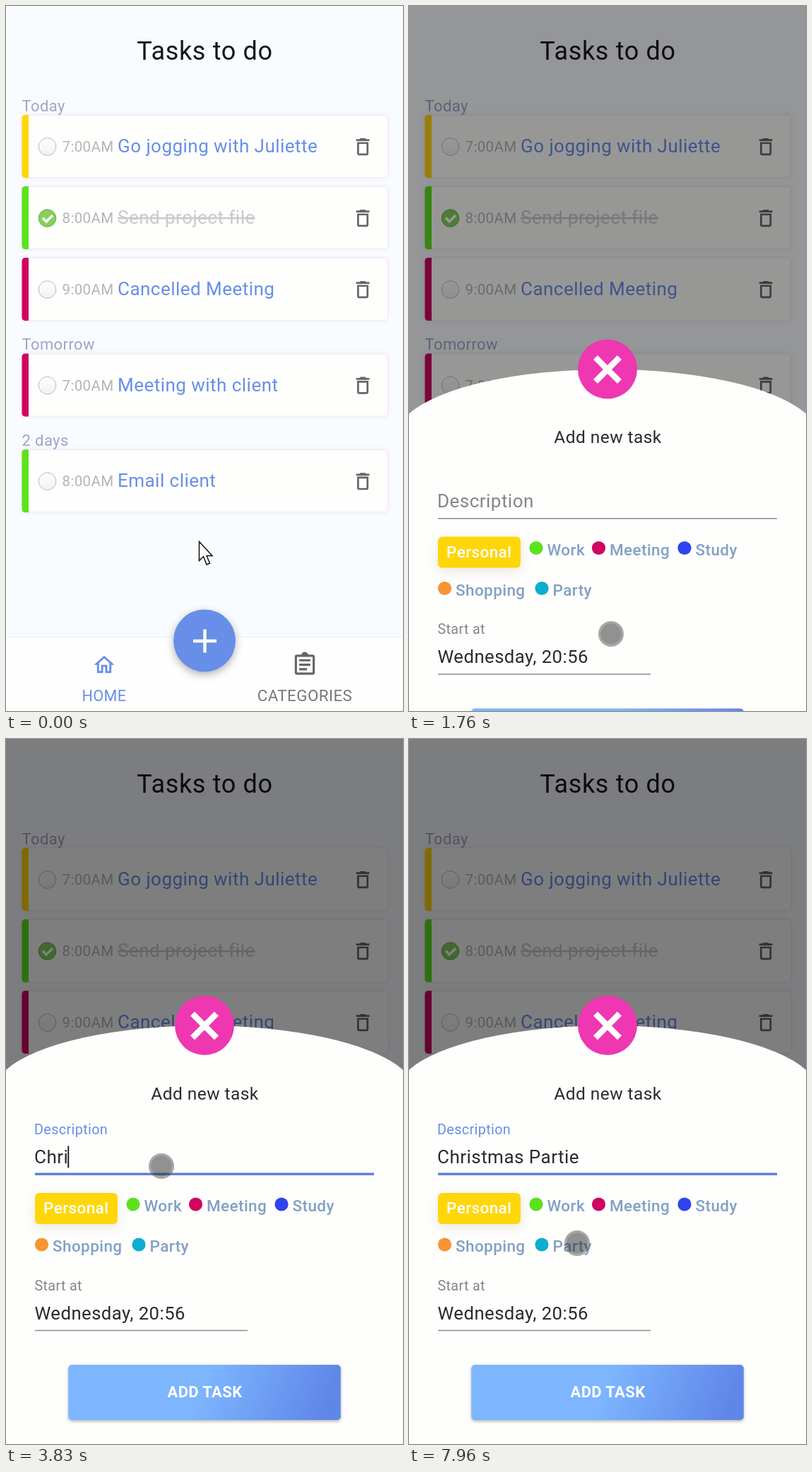
Recreate the animation shown at these times as an HTML page. Size 562 by 997 pixels, loop 8000 ms.

```html
<!DOCTYPE html>
<html lang="en">
<head>
<meta charset="utf-8">
<title>Tasks to do</title>
<style>
  html, body { margin: 0; width: 100%; height: 100%; overflow: hidden; background: #f9fcfe; }
  svg { display: block; width: 100vw; height: 100vh; }
  text { font-family: Roboto, "Open Sans", sans-serif; letter-spacing: .018em; white-space: pre; }
  .card { fill: #fefefd; stroke: #f6e9f6; filter: drop-shadow(0 0 3px rgba(200, 120, 210, .18)); }
  .fab { filter: drop-shadow(0 4px 6px rgba(0, 0, 0, .3)); }
  .chip { filter: drop-shadow(0 5px 9px rgba(120, 110, 60, .16)); }
  .button { filter: drop-shadow(0 2px 2px rgba(0, 0, 0, .3)); }
  .done { text-decoration: line-through; }
</style>
</head>
<body>
<svg viewBox="0 0 562 997" preserveAspectRatio="none">
  <defs>
    <linearGradient id="ring" x2="0" y2="1">
      <stop stop-color="#fefefe"/><stop offset="1" stop-color="#eff2f6"/>
    </linearGradient>
    <linearGradient id="blue" x2="1" y2=".08">
      <stop offset=".52" stop-color="#7db5fe"/><stop offset="1" stop-color="#5f87e8"/>
    </linearGradient>
    <path id="trash" fill="#666" fill-rule="evenodd"
      d="M6 19c0 1.1.9 2 2 2h8c1.1 0 2-.9 2-2V7H6zM8 9h8v10H8zM15.5 4l-1-1h-5l-1 1H5v2h14V4z"/>
  </defs>
  <rect width="562" height="997" fill="#f9fcfe"/>
  <g id="page"></g>
  <g id="nav">
    <rect y="892" width="562" height="105" fill="#fefefe"/>
    <path d="M0 892h562" stroke="#ebeff4"/>
    <path transform="translate(121.6 914.3) scale(1.45)" fill="#678ee8" fill-rule="evenodd"
      d="M12 3L2 12h3v8h6v-6h2v6h6v-8h3zM12 5.7l5 4.5V18h-2v-6H9v6H7v-7.800z"/>
    <g transform="translate(404 912.6) scale(1.58)" fill="none" stroke="#666" stroke-width="2">
      <rect x="4" y="4" width="16" height="16" rx="1"/>
      <path d="M7 8h10M7 12h10M7 16h7"/>
      <path d="M9.5 3.5a2.5 2.5 0 0 1 5 0z" fill="#666" stroke-width="1"/>
    </g>
    <circle class="fab" cx="281" cy="897.5" r="44" fill="#678ee8"/>
    <path d="M265 898h33M281.5 881.5v33" stroke="#fff" stroke-width="4.5"/>
  </g>
  <rect id="shade" width="562" height="997"/>
  <g id="sheet">
    <path d="M0 468A298 94 0 0 1 562 468V997H0z" fill="#fefefd"/>
    <circle cx="281" cy="405" r="42" fill="#ee37b0"/>
    <path d="M264 388.500l34 34M298 388.500l-34 34" stroke="#fff" stroke-width="8.5"/>
    <path d="M41 616.200h480M41 836.500h301" stroke="#8a8a8a" stroke-width="1.5"/>
    <rect id="focus" x="-240" y="613.5" width="480" height="3" fill="#5a80e4"/>
    <rect class="chip" x="41" y="642" width="117" height="44" rx="6" fill="#ffd60a"/>
    <rect class="button" x="88.300" y="885" width="385.500" height="78" rx="5" fill="url(#blue)"/>
    <rect id="caret" y="575.5" width="2" height="31" fill="#222"/>
  </g>
  <path id="arrow" d="M273.5 757.5v27l6-6 4.500 11.500 4.500-2-4.500-10.500h8z" fill="#fff" stroke="#111" stroke-width="1.5"/>
  <g id="touch">
    <circle r="15" fill="rgba(40,40,40,.51)"/>
    <circle r="16.5" fill="none" stroke="rgba(60,60,60,.45)" stroke-width="3"/>
  </g>
</svg>
<script>
const LOOP = 8000, STEP = 1000 / 15;
const $ = id => document.getElementById(id);

function add(parent, tag, attrs, content = '') {
  const el = document.createElementNS('http://www.w3.org/2000/svg', tag);
  set(el, attrs);
  el.textContent = content;
  parent.append(el);
  return el;
}
function set(el, attrs) {
  for (const key in attrs) el.setAttribute(key, attrs[key]);
}
const label = (parent, content, x, y, size, fill, more) =>
  add(parent, 'text', { x, y, 'font-size': size, fill, ...more }, content);
const centered = { 'text-anchor': 'middle' };

const page = $('page'), sheet = $('sheet');
const GREEN = '#5be21c', YELLOW = '#ffd60a', RED = '#cf0560', INK = '#2b2b2b';

function card(y, color, time, title, done) {
  const g = add(page, 'g', { transform: `translate(0 ${y})` });
  add(g, 'rect', { class: 'card', x: 22.5, y: -44, width: 518, height: 88, rx: 5 });
  add(g, 'path', { d: 'M32-44.500H27.500q-5 0-5 5v79q0 5 5 5h4.500z', fill: color });
  add(g, 'circle', { cx: 58.5, cy: .5, r: 12.3, fill: done ? '#84d15c' : 'url(#ring)', stroke: done ? '#62ae48' : '#b4bac3' });
  if (done) add(g, 'path', { d: 'M52 0l5 5.500 9-9', fill: 'none', stroke: '#fff', 'stroke-width': 3.5 });
  label(g, time, 79.5, 7.5, 20.5, '#b5b5b5');
  label(g, title, 158, 8.5, 26, done ? '#cacaca' : '#678ee8', { class: done ? 'done' : '' });
  add(g, 'use', { href: '#trash', transform: 'translate(489 -15.500) scale(1.34)' });
}

// Each day is a heading followed by its cards.
function day(name, top, cards) {
  label(page, name, 22.5, top - 5.5, 22, '#a3a3c8');
  cards.forEach((content, i) => card(top + 44.5 + i * 101, ...content));
}

label(page, 'Tasks to do', 281.5, 76, 36, '#16161c', centered);
day('Today', 154, [
  [YELLOW, '7:00AM', 'Go jogging with Juliette'],
  [GREEN, '8:00AM', 'Send project file', true],
  [RED, '9:00AM', 'Cancelled Meeting']]);
day('Tomorrow', 491.6, [[RED, '7:00AM', 'Meeting with client']]);
day('2 days', 627.2, [[GREEN, '8:00AM', 'Email client']]);

label($('nav'), 'HOME', 139, 982.5, 21.6, '#678ee8', centered);
label($('nav'), 'CATEGORIES', 423, 982.5, 22.4, '#777', centered);

label(sheet, 'Add new task', 281.5, 509.5, 24.5, INK, centered);
const hint = label(sheet, 'Description', 40, 0, 26);
const typed = label(sheet, '', 40, 600, 26, INK);
label(sheet, 'Personal', 53, 671, 22.5, '#fff', { 'font-weight': 500 });

function category(name, x, row, color) {
  const y = 658 + row * 57;
  add(sheet, 'circle', { cx: x, cy: y, r: 9.6, fill: color });
  label(sheet, name, x + 15.5, y + 10, 22.5, '#82a0c4', { 'font-weight': 500 });
}
category('Work', 180, 0, GREEN);
category('Meeting', 268.5, 0, RED);
category('Study', 390, 0, '#2f43f0');
category('Shopping', 50.5, 1, '#f79433');
category('Party', 188, 1, '#0dadd0');

label(sheet, 'Start at', 40.5, 779.5, 19.7, '#858585');
label(sheet, 'Wednesday, 20:56', 40.5, 820.5, 25.7, INK);
label(sheet, 'ADD TASK', 281.5, 931, 22, '#fff', { ...centered, 'font-weight': 700 });

const progress = (t, from, to) => Math.min(1, Math.max(0, (t - from) / (to - from)));
const easeOut = k => 1 - (1 - k) ** 3;
const easeInOut = k => (1 - Math.cos(Math.PI * k)) / 2;

// The pointer rests at four places; each move bows sideways by "bow".
const MOVES = [
  { from: 480, to: 1300, dx: 13, dy: 130, bow: 6 },
  { from: 1820, to: 2360, dx: -66, dy: -284, bow: 0 },
  { from: 7033, to: 7966, dx: 18, dy: 109, bow: 165 }];

function pointer(t) {
  let x = 273, y = 758;
  for (const { from, to, dx, dy, bow } of MOVES) {
    const k = progress(t, from, to);
    x += dx * easeInOut(k) + bow * Math.sin(Math.PI * k);
    y += dy * easeInOut(k);
  }
  return [x, y];
}

// Every word is typed at an even pace between its first and last key.
const FOCUSED = 2500, BLINK = 530, KEY_LAG = 60;
const keys = [['Christmas', 3230, 4560], [' ', 5100, 5100], ['Partie', 5500, 6160]].flatMap(
  ([word, first, last]) => [...word].map((char, i) =>
    ({ char, at: first + (last - first) * i / Math.max(1, word.length - 1) })));

function render(t) {
  const open = easeOut(progress(t, 1663, 1903));
  set($('shade'), { opacity: open / 2 });
  set(sheet, { visibility: open ? 'visible' : 'hidden', transform: `translate(0 ${592 * (1 - open)})` });

  const focus = easeOut(progress(t, 2545, 2765));
  set(hint, { y: 600 - 41.5 * focus, 'font-size': 26 - 6.2 * focus, fill: focus ? '#678ee8' : '#858585' });
  set($('focus'), { transform: `translate(281 0) scale(${focus} 1)` });

  const pressed = keys.filter(key => key.at <= t + 5);
  typed.textContent = pressed.map(key => key.char).join('');
  const lastInput = pressed.length ? pressed.at(-1).at - KEY_LAG : FOCUSED;
  const lit = focus && Math.floor((t - lastInput) / BLINK) % 2 === 0;
  set($('caret'), {
    x: 40.5 + (pressed.length ? typed.getComputedTextLength() - 1.5 : 0),
    opacity: lit ? 1 : 0 });

  const moving = t > 490;
  set($('touch'), { transform: `translate(${pointer(t)})`, opacity: moving ? 1 : 0 });
  set($('arrow'), { opacity: moving ? 0 : 1 });
}

// The picture advances 15 times per second, half a step off the start.
const start = performance.now();
function tick() {
  const t = (performance.now() - start) % LOOP;
  render((Math.floor((t + 7) / STEP - .5) + .5) * STEP);
  requestAnimationFrame(tick);
}
tick();
</script>
</body>
</html>
```
